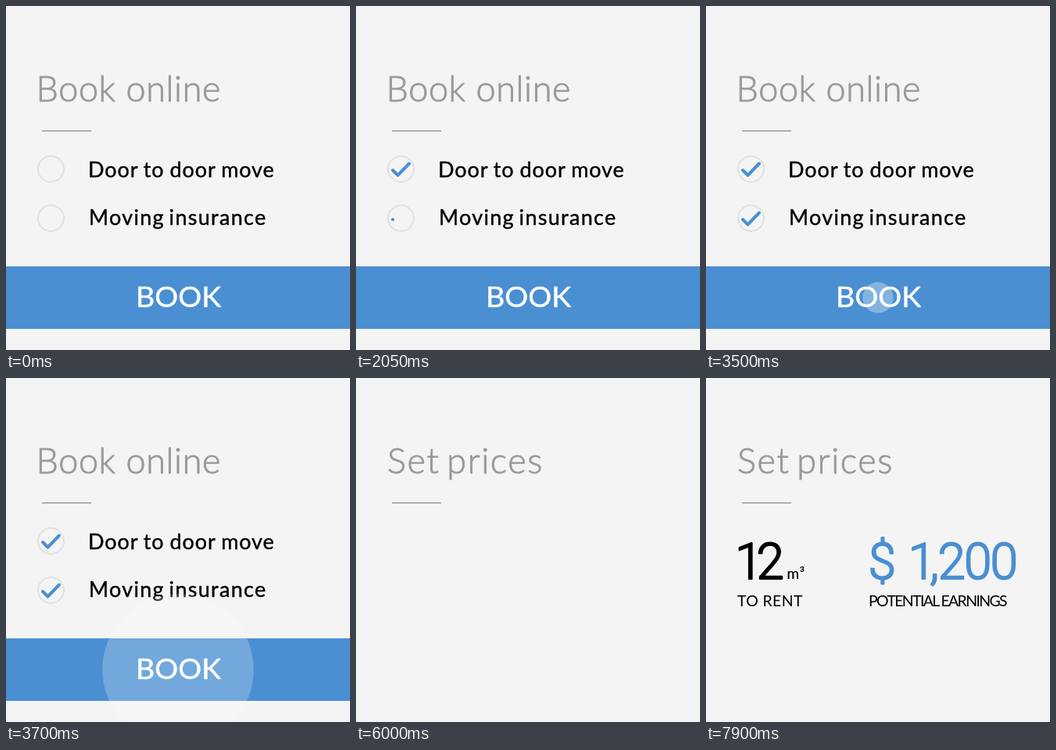
An HTML page that plays this animation: 440 px wide and 440 px high, repeating every 8 s.

```html
<!DOCTYPE html>
<html lang="en">
<head>
<meta charset="utf-8">
<title>Book online</title>
<style>
  :root { --blue: #4a8fd2; --grey: #999; }
  html, body { margin: 0; width: 100%; height: 100%; overflow: hidden; background: #f4f4f4; }
  svg { display: block; width: 100vw; height: 100vh; }

  text { font-family: Lato, sans-serif; stroke-linejoin: round; white-space: pre; }
  .title { font-size: 45px; font-weight: 300; fill: var(--grey); stroke: var(--grey); stroke-width: .9px; }
  .item { font-size: 27px; stroke: #000; stroke-width: .4px; }
  .cta { font-size: 37.5px; fill: #fff; stroke: #fff; stroke-width: .5px; }
  .figure { font: 300 64px Roboto, sans-serif; letter-spacing: -2px; word-spacing: 4px; stroke: #000; stroke-width: 1.9px; }
  .money { fill: var(--blue); stroke: var(--blue); }
  .unit { font-size: 19px; letter-spacing: .5px; stroke: #000; stroke-width: .2px; }
  .label { font-size: 19.5px; }

  .ring { fill: none; stroke: #e0e0e3; stroke-width: 2; }
  .tick {
    fill: none; stroke: var(--blue); stroke-width: 4;
    stroke-linecap: round; stroke-linejoin: round;
    stroke-dasharray: 1 2; stroke-dashoffset: 1.2;
  }

  .tick, .ripple, .stat { animation: 8s linear infinite; }
  .scene { animation: 8s step-end infinite; }
  .booking { animation-name: booking; }
  .pricing { animation-name: pricing; }
  .tick1 { animation-name: tick1; }
  .tick2 { animation-name: tick2; }
  .ripple { animation-name: ripple; fill: #fff; opacity: 0; }
  .stat1 { animation-name: stat1; }
  .stat2 { animation-name: stat2; }

  @keyframes booking { 0% { visibility: visible; } 75%, 100% { visibility: hidden; } }
  @keyframes pricing { 0% { visibility: hidden; } 75%, 100% { visibility: visible; } }
  @keyframes tick1 { 0%, 5.625% { stroke-dashoffset: 1.2; } 10%, 100% { stroke-dashoffset: 0; } }
  @keyframes tick2 { 0%, 25% { stroke-dashoffset: 1.2; } 28.75%, 100% { stroke-dashoffset: 0; } }
  @keyframes ripple {
    0%, 43.125% { r: 0; opacity: .35; }
    51.875%, 100% { r: 270px; opacity: 0; }
  }
  @keyframes stat1 { 0%, 78.75% { opacity: 0; } 82.5%, 100% { opacity: 1; } }
  @keyframes stat2 { 0%, 95% { opacity: 0; } 98.75%, 100% { opacity: 1; } }
</style>
</head>
<body>
<svg viewBox="0 0 440 440">
  <path d="M46 159.75H109" stroke="#999" stroke-width="1.5"/>

  <g class="scene booking">
    <text class="title" x="38.5" y="122" letter-spacing=".6">Book online</text>

    <circle class="ring" cx="57.5" cy="208.5" r="16.5"/>
    <path class="tick tick1" pathLength="1" d="M47 210L53.5 216.5L68 201.5"/>
    <text class="item" x="105" y="219" letter-spacing=".9" word-spacing="-.8">Door to door move</text>

    <circle class="ring" cx="57.5" cy="271.5" r="16.5"/>
    <path class="tick tick2" pathLength="1" d="M47 273L53.5 279.5L68 264.5"/>
    <text class="item" x="106" y="279.5" letter-spacing="1.3" word-spacing="-2.5">Moving insurance</text>

    <rect y="333" width="440" height="80" fill="#4a8fd2"/>
    <circle class="ripple" cx="220" cy="373" r="0"/>
    <text class="cta" x="166" y="385">BOOK</text>
  </g>

  <g class="scene pricing">
    <text class="title" x="40" y="122" letter-spacing="1.6" word-spacing="-5">Set prices</text>

    <g class="stat stat1">
      <text class="figure" x="37" y="257">1<tspan dx="-6">2</tspan></text>
      <text class="unit" x="103.5" y="257">m³</text>
      <text class="label" x="40" y="292" letter-spacing=".35">TO RENT</text>
    </g>

    <g class="stat stat2">
      <text class="figure money" x="207.5" y="257">$ 1<tspan dx="-6">,200</tspan></text>
      <text class="label" x="208" y="292" letter-spacing="-1.65">POTENTIAL EARNINGS</text>
    </g>
  </g>
</svg>
</body>
</html>
```
